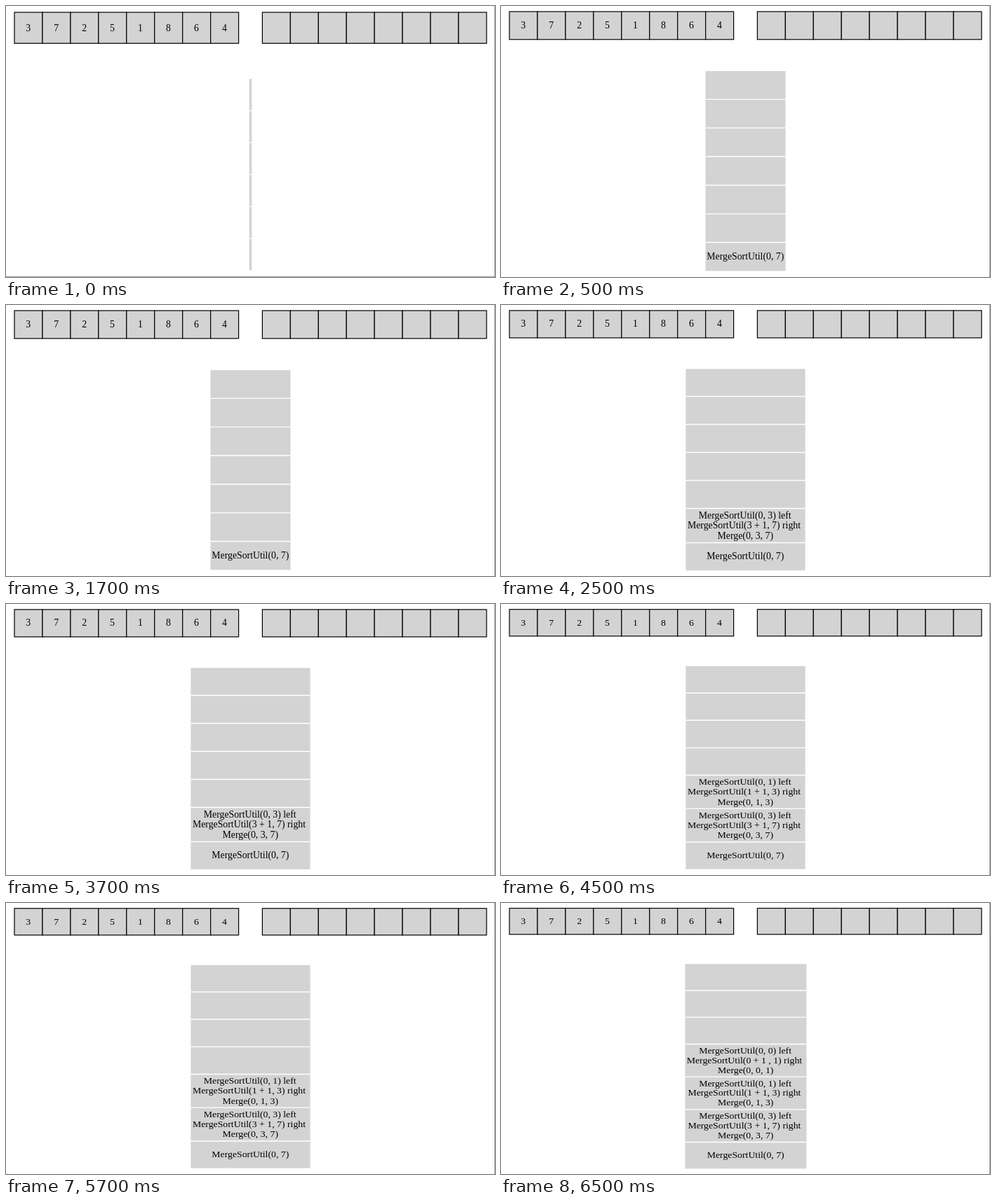
These frames come from a looping animation (697x387 px, 8000 ms). An HTML page:

```html
<!DOCTYPE html>
<html lang="en">
<head>
<meta charset="utf-8">
<title>Merge sort call stack</title>
<style>
html, body { margin: 0; width: 100%; height: 100%; overflow: hidden; background: #fff; }
svg { display: block; width: 697px; height: 387px; }
text { font: 13.8px "Liberation Serif", "Times New Roman", serif; text-anchor: middle; fill: #000; }
.cell { fill: #d3d3d3; stroke: #000; stroke-width: 1.2; }
.row { fill: #d3d3d3; }
.gap { stroke: #fff; stroke-width: 1.3; }
.edge { stroke: #a0a0a0; stroke-width: 1; }
/* Each scene covers the ones before it until the loop restarts. */
.scene { animation: 8s step-end infinite; }
#scene1 { animation-name: show1; }
#scene2 { animation-name: show2; }
#scene3 { animation-name: show3; }
#scene4 { animation-name: show4; }
@keyframes show1 { 0% { visibility: hidden; } 6.25%, 100% { visibility: visible; } }
@keyframes show2 { 0% { visibility: hidden; } 31.25%, 100% { visibility: visible; } }
@keyframes show3 { 0% { visibility: hidden; } 56.25%, 100% { visibility: visible; } }
@keyframes show4 { 0% { visibility: hidden; } 81.25%, 100% { visibility: visible; } }
</style>
</head>
<body>
<svg id="stage" viewBox="0 0 697 387"></svg>
<script>
const NS = "http://www.w3.org/2000/svg";
const stage = document.getElementById("stage");
const values = [3, 7, 2, 5, 1, 8, 6, 4];
const PITCH = 39.95;

const root = ["MergeSortUtil(0, 7)"];
const call = (lo, mid, hi, plus = `${mid} + 1`) => [
  `MergeSortUtil(${lo}, ${mid}) left`,
  `MergeSortUtil(${plus}, ${hi}) right`,
  `Merge(${lo}, ${mid}, ${hi})`
];
const half = call(0, 3, 7);
const quarter = call(0, 1, 3);
const pair = call(0, 0, 1, "0 + 1 ");

// squash: vertical scale; array: top and bottom; stack: left and right;
// edges: row borders from the top; calls: from the bottom row up
const scenes = [
  { squash: 1.12, array: [9, 53.3], stack: [346.7, 350.3],
    edges: [104.2, 149.5, 195, 240.6, 286.4, 332, 377.4], calls: [] },
  { squash: 1.02, array: [8, 47.8], stack: [291.5, 405.5],
    edges: [93, 133.4, 174.2, 215, 256, 296.8, 337.5, 378.3], calls: [root] },
  { squash: 0.99, array: [7.9, 46.9], stack: [263.4, 433.6],
    edges: [91.3, 130.5, 170.5, 210.5, 250.5, 290.5, 339.5, 379], calls: [root, half] },
  { squash: 0.965, array: [7.7, 45.8], stack: [263.4, 433.6],
    edges: [88.7, 127, 166, 205.3, 244.5, 292.2, 340, 378.6], calls: [root, half, quarter] },
  { squash: 0.94, array: [7.5, 44.8], stack: [262.4, 435.4],
    edges: [87.2, 125, 163.2, 201.5, 248.2, 294.8, 341.5, 379.3], calls: [root, half, quarter, pair] }
];

function add(parent, tag, attrs) {
  const el = document.createElementNS(NS, tag);
  for (const key in attrs) el.setAttribute(key, attrs[key]);
  return parent.appendChild(el);
}

function box(parent, name, x1, y1, x2, y2) {
  add(parent, "rect", { class: name, x: x1, y: y1, width: x2 - x1, height: y2 - y1 });
}

function line(parent, name, x1, y1, x2, y2) {
  add(parent, "line", { class: name, x1, y1, x2, y2 });
}

function label(parent, str, x, middle, squash) {
  const y = middle + 4.5 * squash;
  add(parent, "text", { transform: `translate(${x} ${y}) scale(1 ${squash})` }).textContent = str;
}

function drawArray(g, left, items, [top, bottom], squash) {
  for (let i = 0; i < 8; i++) {
    const x = left + i * PITCH;
    box(g, "cell", x, top, x + PITCH, bottom);
    if (items) label(g, items[i], x + 19.7, (top + bottom) / 2 - 0.5, squash);
  }
}

function drawStack(g, { stack: [left, right], edges, calls, squash }) {
  const last = edges.length - 1;
  box(g, "row", left, edges[0], right, edges[last]);
  edges.slice(1, -1).forEach(y => line(g, "gap", left, y, right, y));
  calls.forEach((lines, i) => {
    const middle = (edges[last - i] + edges[last - i - 1]) / 2;
    lines.forEach((str, n) => {
      const shift = str.endsWith("right") ? -2 : str.endsWith("left") ? -0.8 : -0.2;
      const offset = (n - (lines.length - 1) / 2) * 14.8 * squash;
      label(g, str, (left + right) / 2 + shift, middle + offset - 0.3, squash);
    });
  });
}

scenes.forEach((scene, i) => {
  const g = add(stage, "g", { class: "scene", id: "scene" + i });
  add(g, "rect", { width: 697, height: 387, fill: "#fff" });
  drawArray(g, 12, values, scene.array, scene.squash);
  drawArray(g, 365.4, null, scene.array, scene.squash);
  drawStack(g, scene);
  line(g, "edge", 696.5, 0, 696.5, 387);
  if (i === 0) line(g, "edge", 0, 386.5, 697, 386.5);
});
</script>
</body>
</html>
```
